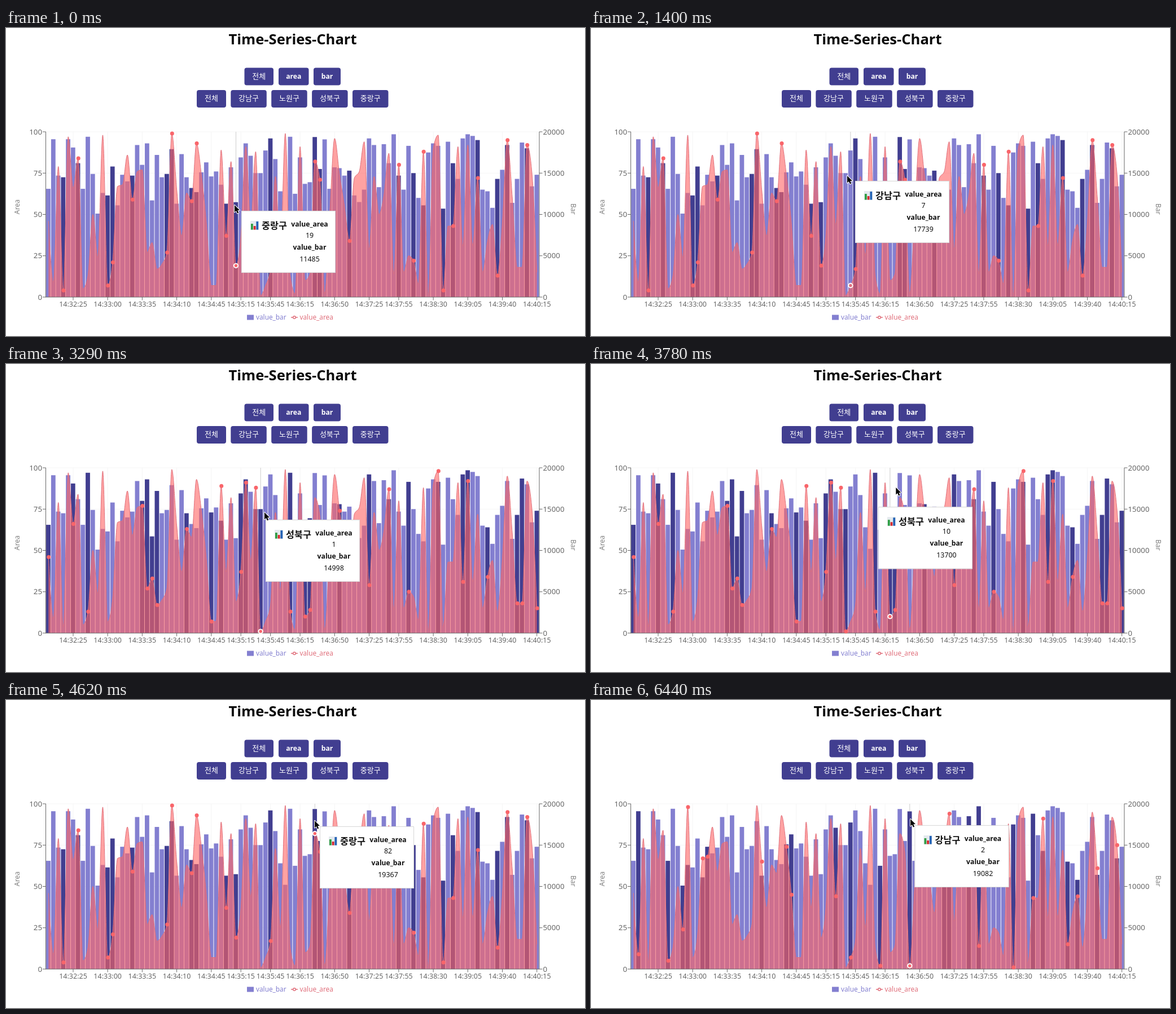
Recreate the animation shown at these times as an HTML page with a canvas. Size 1026 by 546 pixels, loop 6.79 s.

```html
<!DOCTYPE html>
<html lang="ko">
<head>
<meta charset="utf-8">
<title>Time-Series-Chart</title>
<style>
  html, body { margin: 0; width: 100%; height: 100%; overflow: hidden; background: #fff; }
  canvas { display: block; width: 1026px; height: 546px; }
</style>
</head>
<body>
<canvas id="stage"></canvas>
<script>
const W = 1026, H = 546, LOOP = 6790, STEP = 70;
const LEFT = 70.9, RIGHT = 945.1, TOP = 184, BASE = 477, COUNT = 100;
const BAND = (RIGHT - LEFT) / COUNT;
const LATIN = '"Noto Sans", "Open Sans", sans-serif';
const HANGUL = '"Noto Sans CJK KR", "Noto Sans CJK", "Noto Sans", sans-serif';
const DARK = '#413e90', LIGHT = '#837fd0', RED = '#f9656a', ROSE = '#e0707c', GRAY = '#666';

// Bar values in hundreds
const bars = [
  131, 191, 147, 145, 191, 181, 162, 131, 194, 149, 101, 126, 123, 158, 111, 148, 140, 147, 184, 160,
  186, 117, 172, 145, 149, 179, 113, 173, 145, 132, 127, 151, 163, 146, 152, 136, 113, 157, 114.85, 169,
  186, 171, 150, 149.98, 177.39, 192, 167, 128, 102, 194, 125, 169, 137, 139, 193.67, 155, 190.82, 131, 157, 156,
  147, 153, 123, 115, 130, 192, 184, 133, 185, 162, 197, 147, 130, 183, 150, 120, 111, 175, 186, 183,
  107, 188, 162, 143, 192, 197, 195, 190, 130, 128, 108, 143, 154, 184, 114, 143, 187, 180, 134, 148
];
const areas = [
  46, 9, 79, 4, 97, 66, 84, 5, 13, 50, 24, 98, 7, 21, 67, 68, 86, 59, 76, 77,
  27, 33, 17, 20, 27, 99, 65, 37, 63, 58, 93, 74, 45, 7, 7, 89, 37, 82, 19, 37,
  91, 44, 88, 1, 7, 17, 73, 25, 99, 13, 2, 91, 10, 14, 82, 71, 2, 50, 96, 74,
  55, 34, 72, 76, 94, 29, 73, 50, 62, 87, 14, 80, 15, 25, 22, 8, 88, 1, 90, 98,
  4, 43, 43, 91, 31, 92, 31, 72, 15, 34, 44, 13, 45, 95, 61, 18, 18, 92, 75, 15
];
const groups = {
  '중랑구': [3, 6, 12, 13, 17, 24, 25, 29, 30, 36, 38, 45, 54, 55, 61, 71, 74, 76, 80, 82, 87, 91, 93, 97],
  '성북구': [0, 5, 8, 19, 20, 21, 22, 28, 33, 35, 39, 40, 42, 43, 49, 52, 53, 59, 65, 69, 73, 79, 84, 85, 89, 95, 96, 99],
  '강남구': [1, 7, 10, 11, 14, 15, 26, 31, 32, 41, 44, 50, 56, 63, 64, 68, 70, 77, 81, 83, 88, 90, 94, 98]
};
const ticks = [5, 12, 19, 26, 33, 39, 45, 51, 58, 65, 71, 78, 85, 92, 99];

// Motion: [time, x, y]
const pointerKeys = [
  [770, 405, 314], [1260, 461, 258], [1330, 459, 259], [1400, 454, 262], [1540, 449, 266], [3220, 449, 266],
  [3290, 458, 263], [3850, 544, 217], [4200, 545, 213], [4480, 547, 214],
  [5250, 547, 214], [5460, 567, 212], [5880, 566, 211]
];
const tipKeys = [
  [0, 417, 324], [70, 416, 324], [770, 416, 324], [1400, 468, 271], [1470, 469, 271], [1540, 469, 271],
  [1960, 460, 276], [3290, 460, 276], [3920, 516, 250], [4200, 546, 229], [4480, 556, 224],
  [5320, 556, 224], [5530, 566, 222], [5880, 573.5, 222]
];
const selection = [[0, '중랑구'], [2170, '성북구'], [4620, '중랑구'], [6440, '강남구']];

const canvas = document.getElementById('stage');
const ctx = canvas.getContext('2d');
const dpr = window.devicePixelRatio || 1;
canvas.width = W * dpr;
canvas.height = H * dpr;

const xAt = i => LEFT + (i + 0.5) * BAND;
const yAt = v => BASE - v / 100 * (BASE - TOP);
const pad = n => String(n).padStart(2, '0');
const groupOf = i => Object.keys(groups).find(k => groups[k].includes(i)) || '노원구';

function sample(keys, t) {
  const next = keys.findIndex(k => k[0] > t);
  if (next === 0) return keys[0].slice(1);
  if (next < 0) return keys[keys.length - 1].slice(1);
  const a = keys[next - 1], b = keys[next];
  const p = (t - a[0]) / (b[0] - a[0]);
  const e = p * p * (3 - 2 * p);
  return [a[1] + (b[1] - a[1]) * e, a[2] + (b[2] - a[2]) * e];
}

function text(str, x, y, size, color = GRAY, align = 'center', weight = 400, family = LATIN) {
  ctx.font = `${weight} ${size}px ${family}`;
  ctx.fillStyle = color;
  ctx.textAlign = align;
  ctx.fillText(str, x, y);
}

function line(x1, y1, x2, y2, color = GRAY, width = 1) {
  ctx.beginPath();
  ctx.moveTo(x1, y1);
  ctx.lineTo(x2, y2);
  ctx.strokeStyle = color;
  ctx.lineWidth = width;
  ctx.stroke();
}

function dot(x, y, r, fill, stroke, width) {
  ctx.beginPath();
  ctx.arc(x, y, r, 0, Math.PI * 2);
  ctx.fillStyle = fill;
  ctx.fill();
  if (!stroke) return;
  ctx.strokeStyle = stroke;
  ctx.lineWidth = width;
  ctx.stroke();
}

function turned(str, x, y, angle) {
  ctx.save();
  ctx.translate(x, y);
  ctx.rotate(angle);
  text(str, 0, 4, 12.2, '#808080');
  ctx.restore();
}

function button(label, x, y, w, h) {
  ctx.beginPath();
  ctx.roundRect(x, y, w, h, 4);
  ctx.fillStyle = DARK;
  ctx.fill();
  const latin = /^[a-z]/.test(label);
  text(label, x + w / 2, y + 19, latin ? 12.2 : 13, '#fff', 'center', latin ? 600 : 500, latin ? LATIN : HANGUL);
}

function header() {
  text('Time-Series-Chart', 508, 29, 25.6, '#0b0b0b', 'center', 600);
  button('전체', 422.5, 70.5, 51.5, 31);
  button('area', 483, 70.5, 53.5, 31);
  button('bar', 545, 70.5, 48, 31);
  button('전체', 338, 110, 52, 31);
  ['강남구', '노원구', '성북구', '중랑구'].forEach((name, i) => button(name, 398.3 + i * 71.9, 110, 63.5, 31));
}

function axes() {
  line(70.5, TOP, 70.5, BASE);
  line(945, TOP, 945, BASE);
  line(70, BASE, 945, BASE);
  for (let i = 0; i <= 4; i++) {
    const y = yAt(i * 25);
    line(65, y, 70.5, y);
    line(945, y, 950.5, y);
    text(i * 25, 64, y + 4.5, 13.3, GRAY, 'right');
    text(i * 5000, 951.5, y + 4.5, 13.3, GRAY, 'left');
  }
  for (const i of ticks) {
    const s = 32 * 60 + i * 5;
    line(xAt(i), BASE, xAt(i), BASE + 5.5);
    text(`14:${pad(Math.floor(s / 60))}:${pad(s % 60)}`, xAt(i), 493.5, 12.5);
  }
  turned('Area', 20, 317, -Math.PI / 2);
  turned('Bar', 1005, 321, Math.PI / 2);
}

function legend() {
  ctx.fillStyle = LIGHT;
  ctx.fillRect(427, 508.5, 12, 9);
  text('value_bar', 443, 517, 11.8, LIGHT, 'left');
  line(505, 513, 517, 513, ROSE, 1.5);
  dot(511, 513, 2.3, '#fff', ROSE, 1.5);
  text('value_area', 520.5, 517, 11.8, ROSE, 'left');
}

// Monotone cubic through the area values
function curve() {
  const ys = areas.map(yAt);
  const d = ys.slice(1).map((y, i) => (y - ys[i]) / BAND);
  const m = ys.map((_, i) => {
    if (i === 0 || i === COUNT - 1) return 0;
    const a = d[i - 1], b = d[i];
    return (Math.sign(a) + Math.sign(b)) * Math.min(Math.abs(a), Math.abs(b), Math.abs(a + b) / 4);
  });
  m[0] = (3 * d[0] - m[1]) / 2;
  m[COUNT - 1] = (3 * d[COUNT - 2] - m[COUNT - 2]) / 2;
  const path = new Path2D();
  path.moveTo(xAt(0), ys[0]);
  const k = BAND / 3;
  for (let i = 1; i < COUNT; i++) {
    path.bezierCurveTo(xAt(i - 1) + k, ys[i - 1] + m[i - 1] * k, xAt(i) - k, ys[i] - m[i] * k, xAt(i), ys[i]);
  }
  return path;
}
const edge = curve();
const shape = new Path2D(edge);
shape.lineTo(xAt(COUNT - 1), BASE);
shape.lineTo(xAt(0), BASE);
shape.closePath();

function plot(chosen, active) {
  for (const i of ticks) line(xAt(i), TOP, xAt(i), BASE, '#f5f5f5');
  for (let v = 25; v <= 100; v += 25) line(LEFT, yAt(v), RIGHT, yAt(v), '#f5f5f5');
  line(xAt(active), TOP, xAt(active), BASE, '#ccc');
  bars.forEach((v, i) => {
    const y = yAt(v / 2);
    ctx.fillStyle = chosen.includes(i) ? DARK : LIGHT;
    ctx.fillRect(xAt(i) - 4.1, y, 7.8, BASE - y);
  });
  ctx.fillStyle = 'rgba(255, 100, 100, 0.6)';
  ctx.fill(shape);
  ctx.strokeStyle = ROSE;
  ctx.lineWidth = 1;
  ctx.stroke(edge);
  axes();
  for (const i of chosen) dot(xAt(i) + 0.5, yAt(areas[i]), 3.5, RED);
  dot(xAt(active), yAt(areas[active]), 3.7, chosen.includes(active) ? RED : ROSE, '#fff', 1.9);
}

function chartIcon(x, y) {
  ctx.fillStyle = '#e4e9ee';
  ctx.fillRect(x, y, 15, 16);
  [['#2f9e44', 5], ['#d6282f', 9], ['#2463b5', 1]].forEach(([color, top], i) => {
    ctx.fillStyle = color;
    ctx.fillRect(x + 1 + i * 4.7, y + top, 3.8, 15.5 - top);
  });
}

function tooltip(x, y, i) {
  ctx.fillStyle = '#fff';
  ctx.fillRect(x, y, 167, 110);
  ctx.strokeStyle = '#ccc';
  ctx.lineWidth = 0.8;
  ctx.strokeRect(x + 0.4, y + 0.4, 166.2, 109.2);
  chartIcon(x + 16, y + 18);
  const ink = '#111', mid = x + 121;
  text(groupOf(i), x + 36, y + 31.5, 16.3, ink, 'left', 700, HANGUL);
  text('value_area', mid, y + 27.5, 12.2, ink, 'center', 600);
  text(areas[i], mid, y + 48, 12.4, ink);
  text('value_bar', mid, y + 69, 12.2, ink, 'center', 600);
  text(Math.round(bars[i] * 100), mid, y + 89.5, 12.4, ink);
}

function pointer(x, y) {
  const pts = [[0, 0], [0, 12.6], [2.9, 10], [5, 14.6], [7.2, 13.6], [5.2, 9.2], [9, 9]];
  ctx.beginPath();
  pts.forEach(([px, py]) => ctx.lineTo(x + px, y + py));
  ctx.closePath();
  ctx.lineJoin = 'round';
  ctx.strokeStyle = '#fff';
  ctx.lineWidth = 2;
  ctx.stroke();
  ctx.fillStyle = '#000';
  ctx.fill();
}

function draw(t) {
  const chosen = groups[selection.filter(s => s[0] <= t).pop()[1]];
  // The hovered column trails the pointer by one step
  const active = Math.round((sample(pointerKeys, t - STEP)[0] - xAt(0)) / BAND);
  ctx.setTransform(dpr, 0, 0, dpr, 0, 0);
  ctx.fillStyle = '#fff';
  ctx.fillRect(0, 0, W, H);
  header();
  plot(chosen, active);
  legend();
  tooltip(...sample(tipKeys, t), active);
  pointer(...sample(pointerKeys, t));
}

const start = performance.now();
function frame() {
  const t = (performance.now() - start) % LOOP;
  draw(Math.floor(t / STEP) * STEP);
  requestAnimationFrame(frame);
}
frame();
</script>
</body>
</html>
```
